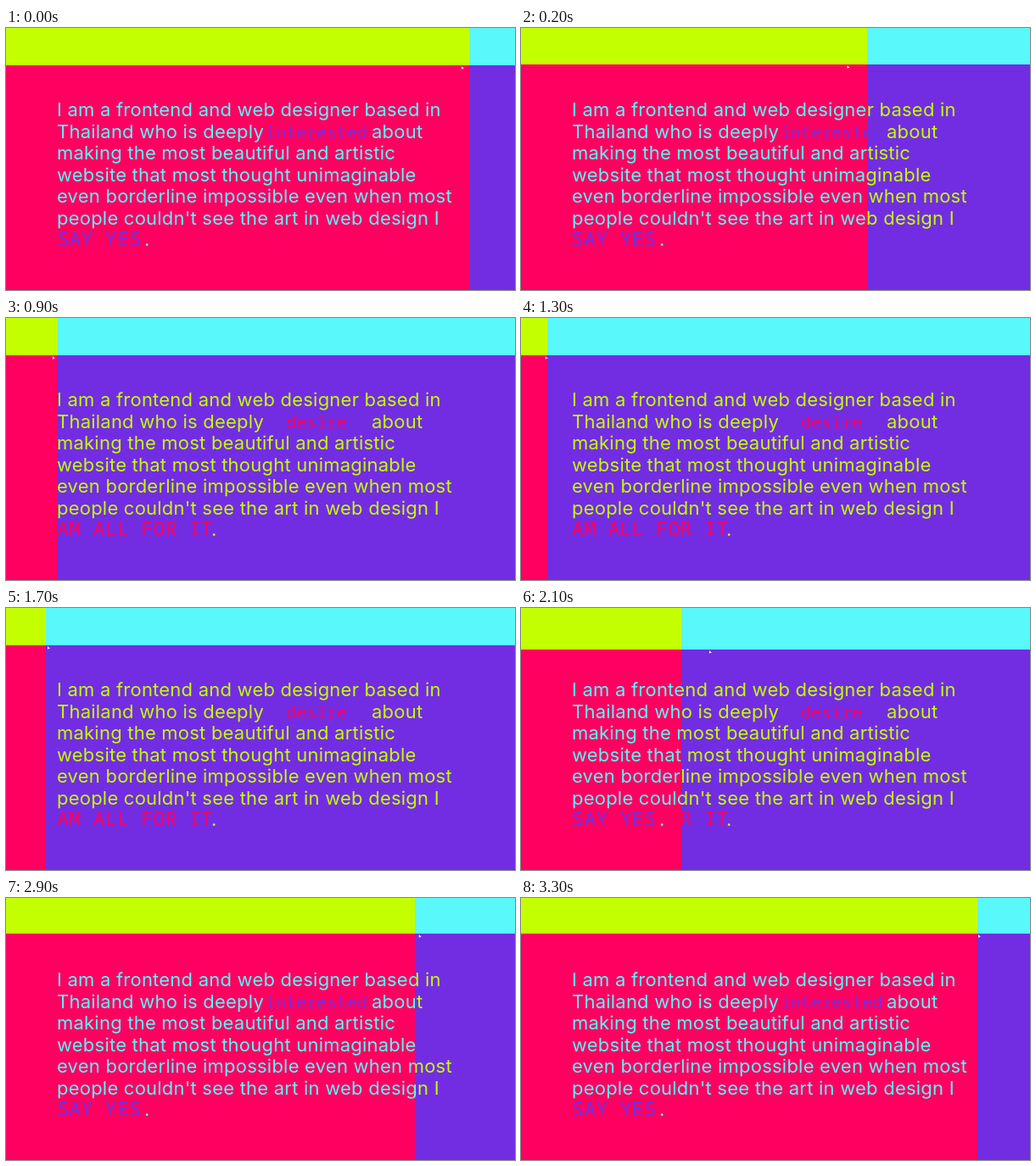
An HTML page that plays this animation: 600x309 px, repeating every 3400 ms.

```html
<!DOCTYPE html>
<html lang="en">
<head>
<meta charset="utf-8">
<style>
  html, body { margin: 0; width: 100%; height: 100%; overflow: hidden; }
  svg { display: block; width: 600px; height: 309px; }
  text { font: 400 22px Inter, sans-serif; letter-spacing: .22px; white-space: pre; }
  .word { font: 400 20px "Noto Sans Mono", monospace; letter-spacing: 0; }
  .shout { font-size: 23.6px; }
</style>
</head>
<body>
<svg viewBox="0 0 600 309">
  <clipPath id="left"><rect id="edge" height="309"/></clipPath>
  <g id="right"></g>
  <g id="over" clip-path="url(#left)"></g>
  <path id="cursor" d="M0 0v4l1-1h2z" fill="#fff"/>
</svg>
<script>
const LOOP = 3400, STEP = 100;
const LIME = '#c4ff00', CYAN = '#58f8fb', PINK = '#ff0060', PURPLE = '#722de3';
const $ = id => document.getElementById(id);

const lines = [
  'I am a frontend and web designer based in',
  'Thailand who is deeply',
  'making the most beautiful and artistic',
  'website that most thought unimaginable',
  'even borderline impossible even when most',
  "people couldn't see the art in web design I"
];
const baseline = row => 104 + 25.5 * row;
const label = (x, row, fill, str, cls = '') =>
  `<text x="${x}" y="${baseline(row)}" fill="${fill}" class="${cls}">${str}</text>`;

function side({ top, back, ink, accent, word, wordX, shout, dotX }) {
  return `<rect width="600" height="309" fill="${back}"/>
    <rect class="band" width="600" fill="${top}"/>` +
    lines.map((s, row) => label(60, row, ink, s)).join('') +
    label(wordX, 1, accent, word, 'word') +
    label(431, 1, ink, 'about') +
    label(60, 6, accent, shout, 'word shout') +
    label(dotX, 6, ink, '.');
}
$('right').innerHTML = side({ top: CYAN, back: PURPLE, ink: LIME, accent: PINK,
  word: 'desire', wordX: 330, shout: 'AM ALL FOR IT', dotX: 242 });
$('over').innerHTML = side({ top: LIME, back: PINK, ink: CYAN, accent: PURPLE,
  word: 'interested', wordX: 306, shout: 'SAY YES', dotX: 163 });
const bands = document.querySelectorAll('.band');

// Looping cubic through keys taken at these times
const times = [0, 500, 900, 1700, 2100, 2500, 3300];
const edgeX = [546, 196, 61, 47, 189, 400, 538];
const edgeY = [44, 41, 44, 44, 49, 44, 42];
const cursorX = [537, 160, 55, 49, 222, 410, 539];

function curve(keys, t) {
  const n = times.length;
  const time = i => times[(i + n) % n] + LOOP * Math.floor(i / n);
  const key = i => keys[(i + n) % n];
  const slope = i => (key(i + 1) - key(i - 1)) / (time(i + 1) - time(i - 1));
  let i = n - 1;
  while (times[i] > t) i--;
  const span = time(i + 1) - time(i), u = (t - time(i)) / span, v = 1 - u;
  return key(i) * v * v * (1 + 2 * u) + key(i + 1) * u * u * (3 - 2 * u) +
    span * u * v * (slope(i) * v - slope(i + 1) * u);
}

function draw(now) {
  const t = Math.floor(now % LOOP / STEP) * STEP;
  const y = Math.round(curve(edgeY, t));
  $('edge').setAttribute('width', Math.round(curve(edgeX, t)));
  bands.forEach(b => b.setAttribute('height', y));
  $('cursor').setAttribute('transform', `translate(${curve(cursorX, t)} ${y + 1})`);
}

let start;
function tick(now) {
  start ??= now;
  draw(now - start);
  requestAnimationFrame(tick);
}
draw(0);
requestAnimationFrame(tick);
</script>
</body>
</html>
```
